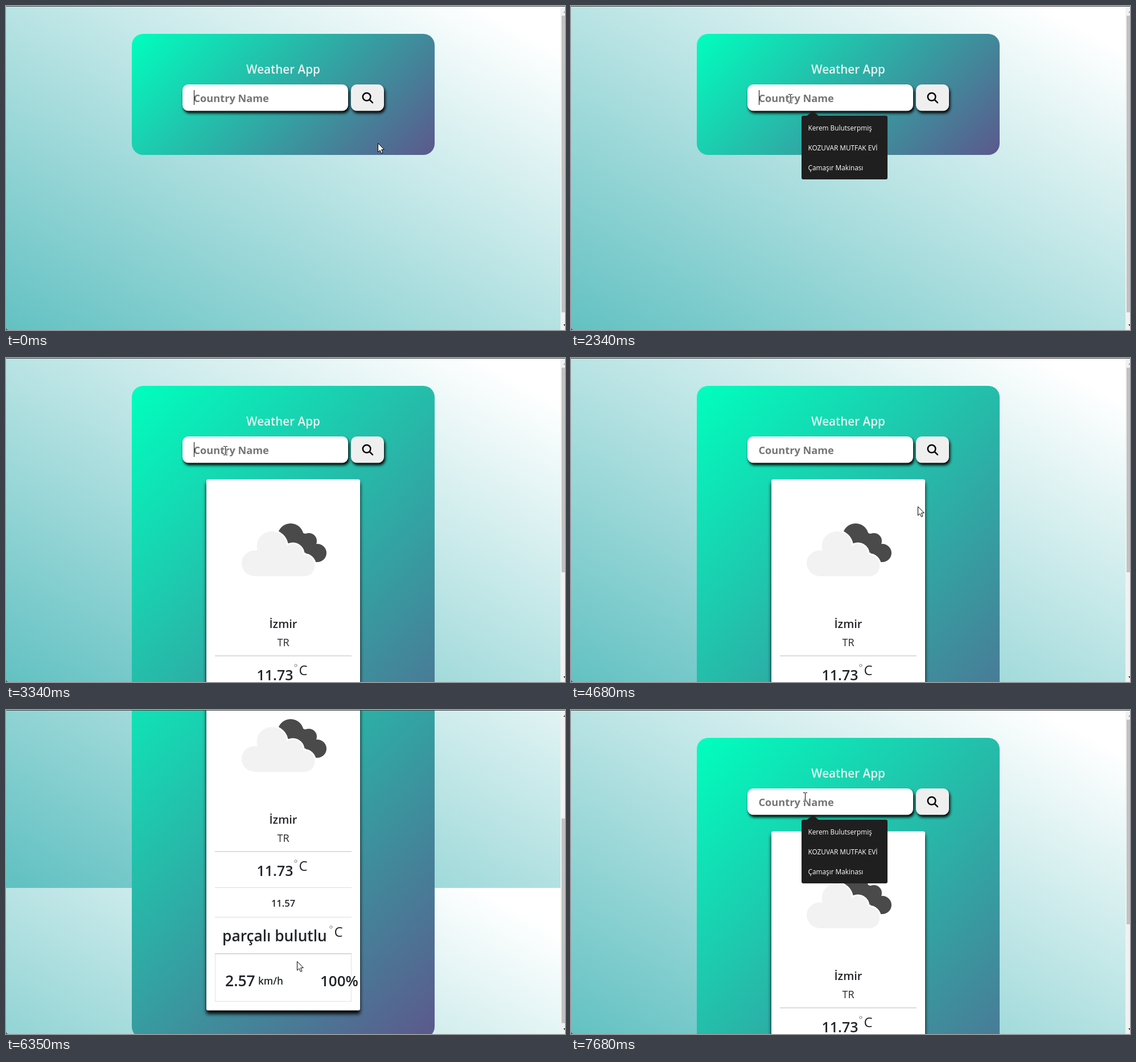
Animation, 982 px wide and 570 px high, one loop 8 s. Source, as an HTML page with a canvas:

```html
<!DOCTYPE html>
<html lang="en">
<head>
<meta charset="utf-8">
<title>Weather App</title>
<style>
  html, body { margin: 0; width: 100%; height: 100%; overflow: hidden; background: #fff; }
  canvas { display: block; }
</style>
</head>
<body>
<canvas id="stage" width="982" height="570"></canvas>
<script>
const ctx = document.getElementById('stage').getContext('2d');
const W = 982, H = 570, VIEW_W = 974, TILE_H = 588, LOOP = 8000;
const FAMILY = '"Open Sans", "Noto Sans", sans-serif';
const INK = '#212529';

// Each step changes only the listed parts of the state and holds until the next one.
const steps = [
  [0, { pointer: 'arrow', x: 653, y: 241, caret: true, text: '', menu: false, result: false, scroll: 0 }],
  [330, { pointer: 'beam', x: 383, y: 163, caret: false }],
  [670, { menu: true }],
  [1340, { x: 385, caret: true }],
  [1670, { caret: false }],
  [2340, { caret: true }],
  [2670, { text: 'I', menu: false }],
  [3010, { text: 'Izmir' }],
  [3340, { text: '', result: true }],
  [3670, { caret: false }],
  [4010, { pointer: 'arrow', x: 609, y: 261, caret: true }],
  [4680, { caret: false }],
  [5010, { scroll: 280 }],
  [5680, { x: 560, y: 352 }],
  [6010, { x: 511, y: 442 }],
  [6350, { scroll: 275 }],
  [6680, { scroll: 0 }],
  [7010, { x: 490, y: 318 }],
  [7350, { pointer: 'beam', x: 428, y: 176 }],
  [7680, { x: 411, y: 153, menu: true }]
];

function stateAt(time) {
  const state = {};
  for (const [start, change] of steps) if (time >= start) Object.assign(state, change);
  return state;
}

// Linear gradient over a box, with the angle measured as in CSS.
function gradient(x, y, w, h, degrees, stops) {
  const a = degrees * Math.PI / 180, dx = Math.sin(a), dy = -Math.cos(a);
  const half = (Math.abs(w * dx) + Math.abs(h * dy)) / 2;
  const cx = x + w / 2, cy = y + h / 2;
  const g = ctx.createLinearGradient(cx - dx * half, cy - dy * half, cx + dx * half, cy + dy * half);
  stops.forEach(([at, color]) => g.addColorStop(at, color));
  return g;
}

function box(x, y, w, h, radius, fill, shadow) {
  ctx.save();
  if (shadow) {
    [ctx.shadowOffsetX, ctx.shadowOffsetY, ctx.shadowBlur] = shadow;
    ctx.shadowColor = '#000';
  }
  ctx.fillStyle = fill;
  ctx.beginPath();
  ctx.roundRect(x, y, w, h, radius);
  ctx.fill();
  ctx.restore();
}

function label(text, x, y, size, weight, color, align = 'left') {
  ctx.font = `${weight} ${size}px ${FAMILY}`;
  ctx.fillStyle = color;
  ctx.textAlign = align;
  ctx.fillText(text, x, y);
}

function polygon(points, fill) {
  ctx.beginPath();
  points.forEach(([x, y]) => ctx.lineTo(x, y));
  ctx.closePath();
  ctx.fillStyle = fill;
  ctx.fill();
}

function circles(list) {
  const path = new Path2D();
  for (const [x, y, r] of list) {
    path.moveTo(x + r, y);
    path.arc(x, y, r, 0, 7);
  }
  return path;
}

function drawBackground() {
  for (const y of [0, TILE_H]) {
    ctx.fillStyle = gradient(0, y, VIEW_W, TILE_H, 29, [[0, '#60c0c1'], [0.93, '#fff']]);
    ctx.fillRect(0, y, VIEW_W, TILE_H);
  }
}

function drawPanel(height) {
  box(221, 49, 532, height, 20,
    gradient(221, 49, 532, height, 135, [[0, '#00ffbe'], [1, '#5c588c']]));
}

function drawSearch(state) {
  label('Weather App', 487, 119, 20.7, 600, '#e8f3f1', 'center');
  const shadow = [2, 4, 5];
  box(310, 138, 291, 46.5, 10, '#fff', shadow);
  box(606, 138, 58, 46.5, 10, '#efefef', shadow);

  ctx.strokeStyle = '#000';
  ctx.lineWidth = 2.5;
  ctx.lineCap = 'round';
  ctx.beginPath();
  ctx.arc(633.6, 159.8, 6.8, 0, 7);
  ctx.moveTo(638.8, 165);
  ctx.lineTo(644, 170.2);
  ctx.stroke();

  label(state.text || 'Country Name', 329.5, 169, 18.2, 700, state.text ? '#000' : '#757575');
  if (state.caret) {
    const offset = state.text ? Math.round(ctx.measureText(state.text).width) : 0;
    ctx.fillStyle = '#000';
    ctx.fillRect(330 + offset - (offset ? 1 : 0), 148, 1, 26);
  }
}

function drawClouds() {
  ctx.fillStyle = '#4a4a4b';
  ctx.fill(circles([[500, 314, 23], [532, 322, 14], [547, 343, 16]]));
  polygon([[490, 330], [515, 305], [540, 315], [547, 359], [520, 359]], '#4a4a4b');

  const light = circles([[436.5, 361, 22.5], [467, 331.5, 26.5], [504, 345, 18], [523.5, 365, 19]]);
  light.rect(436, 345, 88, 39);
  ctx.strokeStyle = '#fff';
  ctx.lineWidth = 5;
  ctx.stroke(light);
  ctx.fillStyle = '#f2f2f2';
  ctx.fill(light);
}

function celsius(x, y) {
  ctx.strokeStyle = '#777';
  ctx.lineWidth = 0.9;
  ctx.beginPath();
  ctx.arc(x, y, 2.2, 0, 7);
  ctx.stroke();
  label('C', x + 5.5, y + 17, 24, 500, INK);
}

function drawResult() {
  box(352, 213.5, 270, 590, 3, '#fff', [0, 6, 6]);
  drawClouds();
  label('İzmir', 487, 475, 20, 600, INK, 'center');
  label('TR', 487, 507, 18, 400, INK, 'center');

  ctx.fillStyle = '#d9dee0';
  for (const y of [523, 587, 639]) ctx.fillRect(367, y, 240, y === 523 ? 2 : 1);
  ctx.strokeStyle = '#dee2e6';
  ctx.lineWidth = 1;
  ctx.strokeRect(367.5, 703.5, 239, 84);
  ctx.fillStyle = '#c9cdd0';
  ctx.fillRect(367, 703, 240, 1.5);

  label('11.73', 440.5, 567, 25, 600, INK);
  celsius(509, 541);
  label('11.57', 487, 621, 16.5, 600, INK, 'center');
  label('parçalı bulutlu', 380, 682, 26.3, 600, INK);
  celsius(571, 657);
  label('2.57', 385, 761, 26.5, 600, INK);
  label('km/h', 443, 758, 17.2, 600, INK);
  label('100%', 552, 761, 26, 600, INK);
}

function drawMenu() {
  box(405, 193, 151, 112, 3, '#1f1f1f');
  polygon([[414, 193.5], [422, 187], [425, 186], [428, 187], [435, 193.5]], '#1f1f1f');
  ['Kerem Bulutserpmiş', 'KOZUVAR MUTFAK EVİ', 'Çamaşır Makinası'].forEach((item, i) =>
    label(item, 416.5, 219 + i * 35, 11.8, 400, '#fff'));
}

function drawScrollbar(state) {
  ctx.fillStyle = '#f1f1f1';
  ctx.fillRect(VIEW_W, 0, W - VIEW_W, H);
  ctx.fillStyle = '#c1c1c1';
  ctx.fillRect(976, 17 + state.scroll * 0.632, 6, state.result ? 360 : 522);
  polygon([[979, 12], [982.5, 8], [986, 12]], state.scroll ? '#505050' : '#a3a3a3');
  polygon([[979, 560], [982.5, 564], [986, 560]], '#303030');
}

function drawWindowEdge() {
  ctx.fillStyle = '#3b3f40';
  ctx.fillRect(0, 0, W, 1);
  ctx.beginPath();
  ctx.moveTo(0, H - 5);
  ctx.quadraticCurveTo(0, H, 5, H);
  ctx.lineTo(0, H);
  ctx.fill();
}

function drawPointer({ pointer, x, y }) {
  ctx.save();
  ctx.translate(x, y);
  ctx.lineJoin = 'miter';
  ctx.lineCap = 'butt';
  if (pointer === 'arrow') {
    polygon([[0.5, 0.5], [0.5, 16], [4, 12.8], [6.5, 18.3], [9, 17.2], [6.6, 11.8], [11.3, 11.5]], '#fff');
    ctx.strokeStyle = '#000';
    ctx.lineWidth = 1;
    ctx.stroke();
  } else {
    ctx.beginPath();
    for (const end of [-7.5, 7.5]) {
      ctx.moveTo(-3, end);
      ctx.lineTo(0, end);
      ctx.moveTo(1, end);
      ctx.lineTo(4, end);
    }
    ctx.moveTo(0.5, -7);
    ctx.lineTo(0.5, 7);
    for (const [color, width] of [['#fff', 3], ['#000', 1]]) {
      ctx.strokeStyle = color;
      ctx.lineWidth = width;
      ctx.stroke();
    }
  }
  ctx.restore();
}

function draw(time) {
  const state = stateAt(time);
  ctx.clearRect(0, 0, W, H);
  ctx.save();
  ctx.translate(0, -state.scroll);
  drawBackground();
  drawPanel(state.result ? 803 : 213);
  drawSearch(state);
  if (state.result) drawResult();
  if (state.menu) drawMenu();
  ctx.restore();
  drawScrollbar(state);
  drawWindowEdge();
  drawPointer(state);
}

const start = performance.now();
function tick() {
  draw((performance.now() - start) % LOOP);
  requestAnimationFrame(tick);
}
tick();
</script>
</body>
</html>
```
